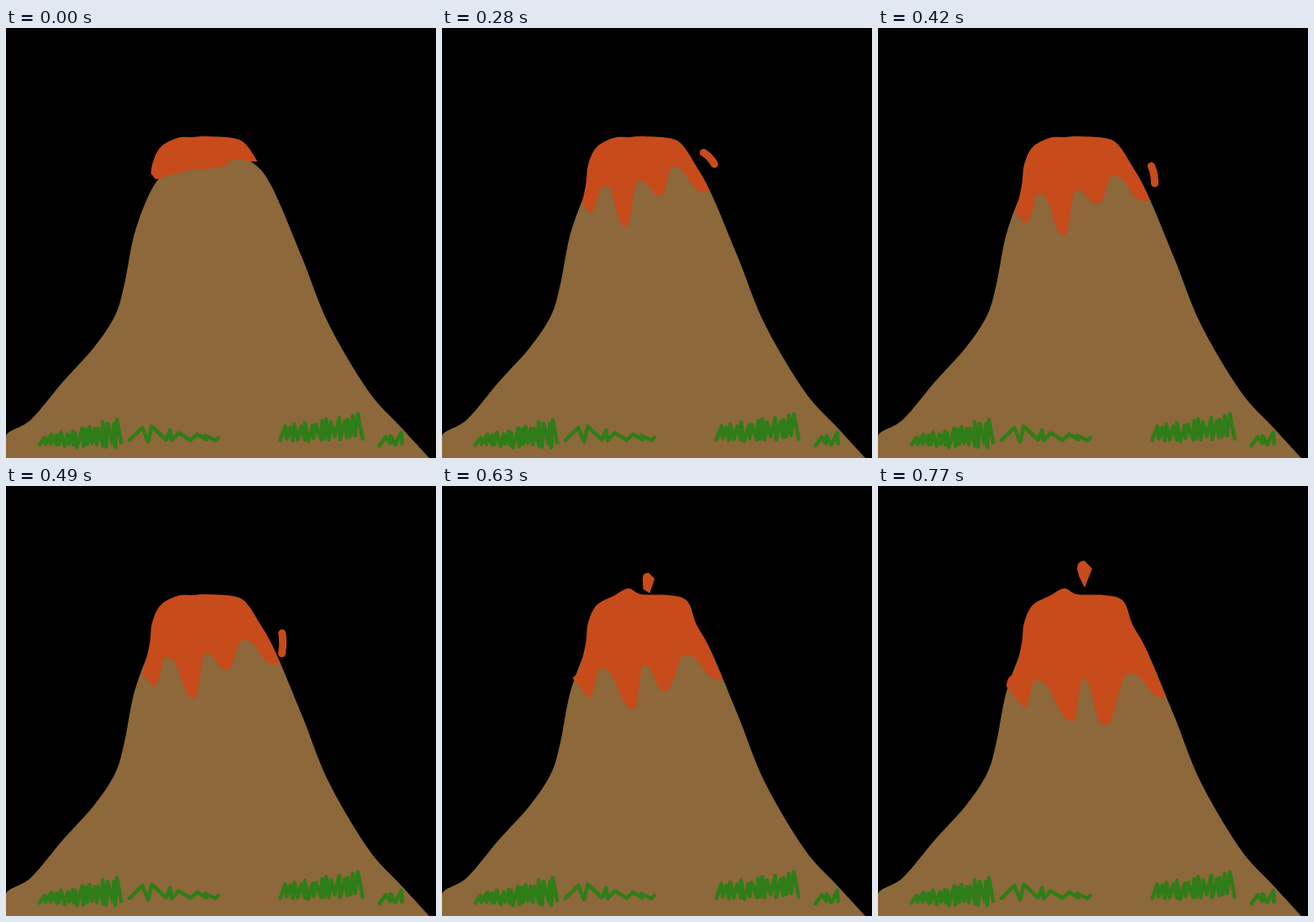
Animation of 512 by 512 pixels, one loop 0.84 s. Source, as an HTML page with a canvas:

```html
<!DOCTYPE html>
<html lang="en">
<head>
<meta charset="utf-8">
<title>Volcano</title>
<style>
  html, body { margin: 0; width: 100%; height: 100%; overflow: hidden; background: #000; }
  canvas { display: block; }
</style>
</head>
<body>
<canvas id="stage" width="512" height="512"></canvas>
<script>
const ctx = document.getElementById('stage').getContext('2d');
const SIZE = 512, STEP_MS = 70, STEPS = 12, LAST = STEPS - 1, SWELL_STEP = 8;
const ROCK = '#8c683a', LAVA = '#c84b1b', GRASS = '#2f7d18';

const mix = (a, b, k) => a + (b - a) * k;

function seededRandom(seed) {
  return () => (seed = seed * 16807 % 2147483647) / 2147483647;
}

// Smooth closed shape through a few key points.
function smoothShape(keys) {
  const path = new Path2D();
  const at = i => keys[Math.max(0, Math.min(keys.length - 1, i))];
  path.moveTo(...keys[0]);
  for (let i = 0; i < keys.length - 1; i++) {
    const [a, b, c, d] = [at(i - 1), at(i), at(i + 1), at(i + 2)];
    path.bezierCurveTo(b[0] + (c[0] - a[0]) / 6, b[1] + (c[1] - a[1]) / 6,
      c[0] - (d[0] - b[0]) / 6, c[1] - (d[1] - b[1]) / 6, ...c);
  }
  path.closePath();
  return path;
}

const mountain = smoothShape([
  [0, 512], [0, 485], [30, 466], [68, 421], [105, 380], [130, 342], [141, 305], [155, 238],
  [183, 178], [225, 158], [265, 150], [293, 160], [316, 188], [352, 272], [384, 352],
  [432, 433], [470, 475], [504, 512]
]);

// Zigzag scribbles; centre line and height change along each tuft.
const tufts = [
  { from: 42, to: 136, centre: [492, 483], height: [10, 34], turns: 34 },
  { from: 153, to: 258, centre: [483, 489], height: [24, 4], turns: 13 },
  { from: 329, to: 424, centre: [484, 474], height: [18, 28], turns: 30 },
  { from: 448, to: 473, centre: [492, 488], height: [10, 16], turns: 6 }
];

function scribble({ from, to, centre, height, turns }) {
  const random = seededRandom(from), path = new Path2D(), gap = (to - from) / turns;
  for (let i = 0; i <= turns; i++) {
    const k = i / turns, side = i % 2 ? -0.5 : 0.5;
    const x = mix(from, to, k) + (random() - 0.5) * gap * 1.5;
    const y = mix(...centre, k) + side * mix(...height, k) * (0.6 + 0.5 * random());
    path.lineTo(x, y);
  }
  return path;
}

const grass = tufts.map(scribble);

// Lower lava edge, left to right: drip tips alternate with the gaps between them.
// Each one surges at first, then grows by a power curve, drifting as it falls.
const edge = [
  { x: 178, drift: -4, top: 180, surge: 15, growth: 70, power: 1 },
  { x: 196, drift: -8, top: 175, surge: 0, growth: 56, power: 1.5 },
  { x: 198, drift: 35, top: 173, surge: 52, growth: 55, power: 1.5 },
  { x: 231, drift: 13, top: 168, surge: 0, growth: 61, power: 1.5 },
  { x: 257, drift: 13, top: 165, surge: 30, growth: 90, power: 3 },
  { x: 272, drift: 28, top: 156, surge: 0, growth: 67, power: 2 },
  { x: 294, drift: 45, top: 159, surge: 27, growth: 66, power: 2 }
];

function edgePoint({ x, drift, top, surge, growth, power }, step) {
  const fall = surge * Math.min(1, step / 2) + growth * (step / LAST) ** power;
  return [x + drift * fall / (surge + growth), top + fall];
}

function lavaOutline(step) {
  const swell = step >= SWELL_STEP ? 1 : 0;
  return smoothShape([
    [150, 300], [153, 237], [163, 220], [171, 188], [174, 163], [184, 142], [204, 131],
    [222, 130 - 8 * swell], [237, 129], [270, 131 - swell], [286 + 6 * swell, 139 - 2 * swell],
    [303, 165], [317, 190], [341, 247], [360, 300]
  ]);
}

function drawLava(step) {
  const points = edge.map(part => edgePoint(part, step));
  const [left, right] = [points[0], points.at(-1)];
  ctx.save();
  ctx.clip(lavaOutline(step));
  ctx.beginPath();
  ctx.moveTo(0, 0);
  ctx.lineTo(left[0] - 18, left[1] - 22);
  ctx.lineTo(...left);
  points.slice(1).forEach(([x, y], i) => {
    const [px, py] = points[i], middle = (px + x) / 2;
    ctx.bezierCurveTo(middle, py, middle, y, x, y);
  });
  ctx.lineTo(right[0] + 20, right[1]);
  ctx.lineTo(SIZE, 0);
  ctx.fill();
  ctx.restore();
}

// A streak of lava thrown off the right shoulder along a curved path.
function drawSideSplash(step) {
  const head = step / SWELL_STEP;
  const curve = (a, b, c, u) => mix(mix(a, b, u), mix(b, c, u), u);
  ctx.beginPath();
  for (let i = 0; i <= 8; i++) {
    const u = head - 0.22 * (1 - i / 8);
    ctx.lineTo(curve(284, 344, 325, u), curve(140, 146, 216, u));
  }
  ctx.lineWidth = 9;
  ctx.stroke();
}

// A drop that stretches as it leaves the crater.
function drawTopSplash(step) {
  const k = (step - SWELL_STEP) / (LAST - SWELL_STEP), grown = 1 - (1 - k) ** 2;
  const x = 246, bottom = mix(131, 121, k), top = bottom - mix(15, 32, grown);
  const half = mix(5, 9, grown), shoulder = mix(top, bottom, 0.3);
  ctx.beginPath();
  ctx.moveTo(x + 2 * (1 - k), bottom);
  ctx.lineTo(x - half * mix(1, 0.7, k), mix(top, bottom, mix(0.9, 0.6, k)));
  ctx.lineTo(x - half, shoulder);
  ctx.quadraticCurveTo(x - half, top, x, top);
  ctx.lineTo(x + half, shoulder);
  ctx.fill();
}

function draw(step) {
  ctx.fillStyle = '#000';
  ctx.fillRect(0, 0, SIZE, SIZE);
  ctx.fillStyle = ROCK;
  ctx.fill(mountain);

  ctx.lineCap = ctx.lineJoin = 'round';
  ctx.lineWidth = 4.5;
  ctx.strokeStyle = GRASS;
  grass.forEach(tuft => ctx.stroke(tuft));

  ctx.fillStyle = ctx.strokeStyle = LAVA;
  drawLava(step);
  if (step > 0 && step <= SWELL_STEP) drawSideSplash(step);
  if (step >= SWELL_STEP) drawTopSplash(step);
}

const start = performance.now();
function tick() {
  draw(Math.floor((performance.now() - start) / STEP_MS) % STEPS);
  requestAnimationFrame(tick);
}
tick();
</script>
</body>
</html>
```
